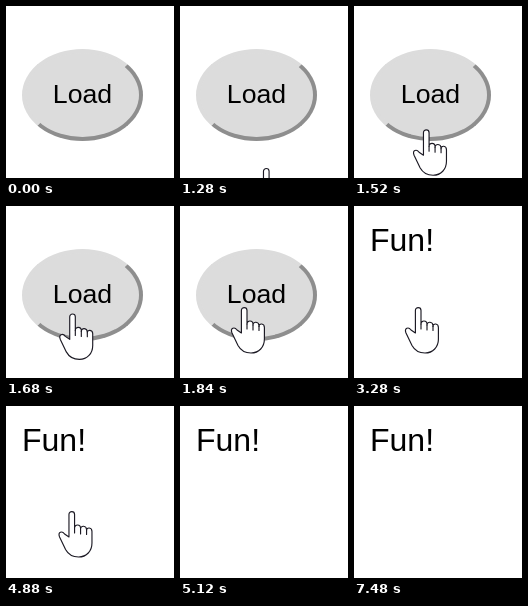
Animation of 168x172 px, one loop 7.52 s. Source, as an HTML page:

```html
<!DOCTYPE html>
<html lang="en">
<head>
<meta charset="utf-8">
<title>Load button</title>
<style>
  html, body { margin: 0; width: 100%; height: 100%; overflow: hidden; background: #fff; }
  #button {
    position: absolute; left: 16px; top: 43px; width: 121px; height: 92px;
    box-sizing: border-box; border: 4px solid; border-radius: 50%;
    border-color: #dcdcdc #8e8e8e #8e8e8e #dcdcdc; background: #dcdcdc;
  }
  #button.pressed { border-color: #8e8e8e #dcdcdc #dcdcdc #8e8e8e; }
  svg { position: absolute; left: 0; top: 0; width: 168px; height: 172px; }
  text { font-family: "Liberation Sans", Arial, sans-serif; fill: #000; }
  #focus { fill: none; stroke: #8484bc; stroke-width: 1.4; }
  #hand { stroke: #1c1a24; stroke-width: 1.15; stroke-linejoin: round; stroke-linecap: round; }
</style>
</head>
<body>
<div id="button"></div>
<svg viewBox="0 0 168 172">
  <rect id="focus" x="15.5" y="42.8" width="121.5" height="92.4" rx="1"/>
  <text id="label" x="76.5" y="97" font-size="26.67" text-anchor="middle">Load</text>
  <text id="result" x="16" y="44.5" font-size="32">Fun!</text>
  <g id="hand">
    <path fill="#fff" d="M-2.6 26V3.4a2.8 2.8 0 0 1 5.6 0V17c0-4 6-4 6 .4v.6c0-4 6-3.5 6 .8v.6c0-3.6 5.4-3 5.4 1V32C20.4 40 15 46 7 46C0 46-3.5 43-6 38.5L-12 26C-14 21-9.5 19.5-7 23Z"/>
    <path fill="none" d="M3 17v5M9 18v5M15 19.4v4"/>
  </g>
</svg>
<script>
const LOOP = 7520, STEP = 40;
const PRESS = 3120, LOADED = 3240;
const REST = [64, 101], ENTRY = [89, 170], EXIT = [93, 175];
const $ = id => document.getElementById(id);
const button = $("button"), focusRing = $("focus"), label = $("label");
const result = $("result"), hand = $("hand");

const show = (element, on) => { element.style.visibility = on ? "visible" : "hidden"; };
const progress = (t, from, to) => Math.min(1, Math.max(0, (t - from) / (to - from)));
const mix = (a, b, p) => a.map((v, i) => v + (b[i] - v) * p);

function handPosition(t) {
  if (t < 4840) return mix(ENTRY, REST, 1 - (1 - progress(t, 1240, 1840)) ** 1.8);
  return mix(REST, EXIT, progress(t, 4840, 5120) ** 1.5);
}

function draw(now) {
  const t = Math.floor((now % LOOP) / STEP) * STEP;
  const loaded = t >= LOADED;
  const pressed = t >= PRESS && !loaded;
  show(button, !loaded);
  show(label, !loaded);
  show(result, loaded);
  show(focusRing, pressed);
  button.classList.toggle("pressed", pressed);
  show(hand, t >= 1240 && t < 5120);
  hand.setAttribute("transform", `translate(${handPosition(t)})`);
}

const start = performance.now();
function frame() {
  draw(performance.now() - start);
  requestAnimationFrame(frame);
}
frame();
</script>
</body>
</html>
```
